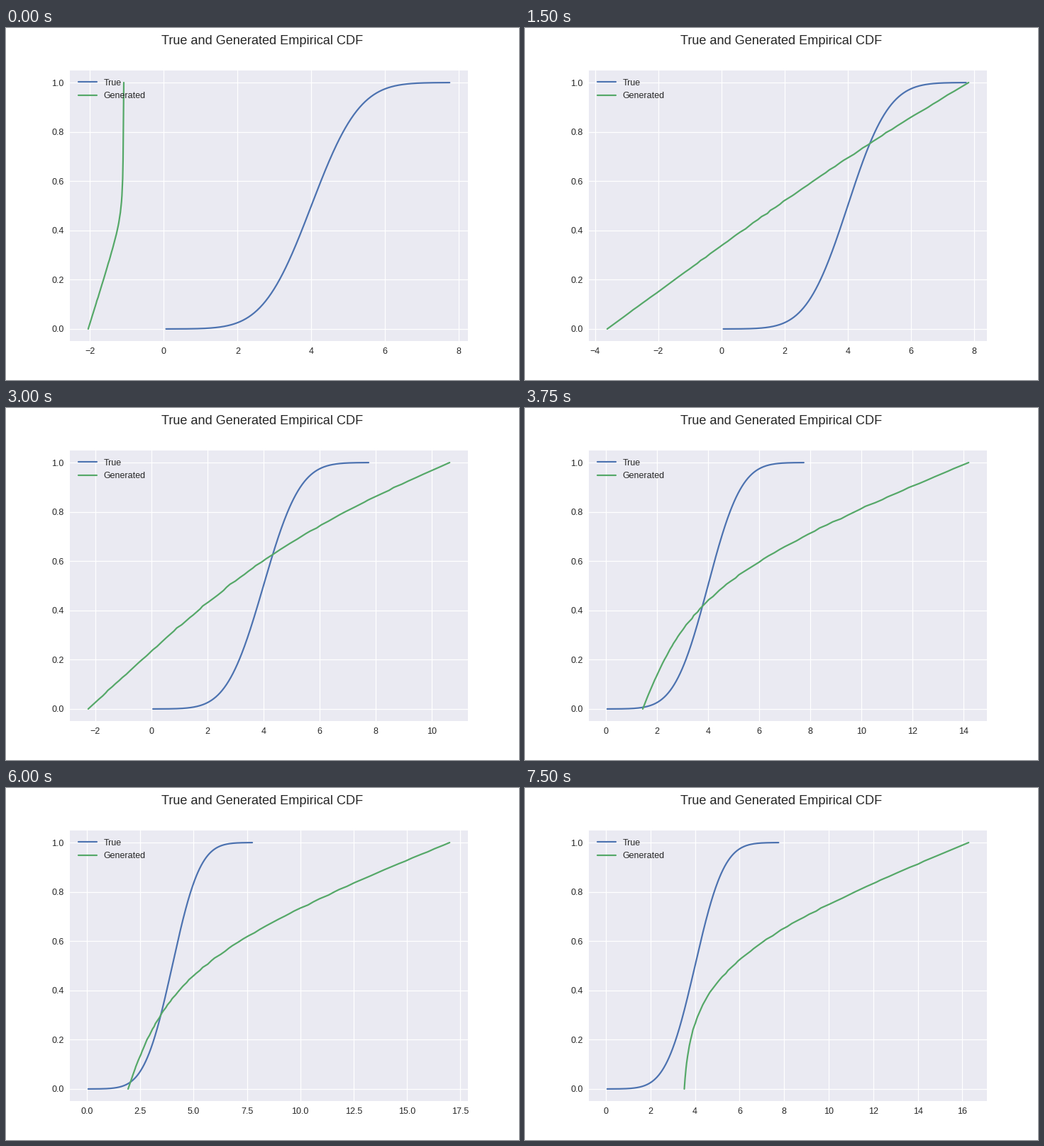
Write a matplotlib script that moves like this. It is 723x497 px and loops after 8000 ms.

```python
import math

import numpy as np
import matplotlib.pyplot as plt
from matplotlib.animation import FuncAnimation

W, H, DPI = 723, 497, 90.4
STEP_MS, HOLD, FRAMES = 250, 3, 32
BLUE, GREEN, PANEL, INK = "#4C72B0", "#55A868", "#EAEAF2", "0.15"
MEAN, SD = 4, 1.025

plt.rcParams.update({
    "font.family": "Liberation Sans",
    "font.size": 10,
    "text.color": INK,
    "lines.linewidth": 1.75,
    "lines.solid_capstyle": "round",
    "axes.facecolor": PANEL,
    "axes.axisbelow": True,
    "grid.color": "white",
    "grid.linewidth": 1,
    "xtick.color": INK,
    "ytick.color": INK,
})

rng = np.random.default_rng(11)
prob = np.linspace(0, 1, 400)


def softplus(z):
    return np.logaddexp(0, z)


def roughen(p):
    """Shift probabilities a little, as a finite sample would."""
    knots = np.linspace(0, 1, 80)
    noise = rng.normal(0, .0026, knots.size) * np.sqrt(knots * (1 - knots))
    return np.clip(p + np.interp(p, knots, noise), 0, 1)


def quantiles(lo, hi, line, centre=.55, width=.15):
    """Generated sample from lo to hi: a straight line mixed with a soft bend."""
    p = roughen(prob)
    start, end = softplus(-centre / width), softplus((1 - centre) / width)
    bend = (softplus((p - centre) / width) - start) / (end - start)
    return np.sort(lo + (hi - lo) * (line * p + (1 - line) * bend))


# One training snapshot after another: range, straightness, place of the bend
SNAPSHOTS = [
    quantiles(-2.05, -1.085, 2.15, .45, .06),
    quantiles(-3.35, 6.5, 1.04),
    quantiles(-3.62, 7.83, .93, .75),
    quantiles(-3.83, 9.0, .84, .75),
    quantiles(-2.25, 10.64, .73, .75),
    quantiles(1.45, 14.2, .25),
    quantiles(1.6, 16.87, .255),
    quantiles(1.82, 17.77, .26),
    quantiles(1.93, 17.0, .21),
    quantiles(2.7, 17.47, .1),
    quantiles(3.52, 16.28, 0),
]

true_x = np.linspace(.06, 7.75, 300)
true_p = [.5 * math.erfc((MEAN - x) / (SD * math.sqrt(2))) for x in true_x]

fig = plt.figure(figsize=((W + .001) / DPI, (H + .001) / DPI), dpi=DPI,
                 facecolor="white")
ax = fig.add_axes([.125, .11, .775, .77])
fig.suptitle("True and Generated Empirical CDF", fontsize=14.4, y=.98)
ax.plot(true_x, true_p, color=BLUE, label="True")
generated, = ax.plot([], [], color=GREEN, label="Generated")
ax.set_ylim(-.05, 1.05)
ax.grid(True)
ax.tick_params(length=0, pad=7)
for spine in ax.spines.values():
    spine.set_visible(False)
ax.legend(loc="upper left", frameon=False, borderaxespad=.56)


def draw(frame):
    x = SNAPSHOTS[frame // HOLD]
    generated.set_data(x, prob)
    lo, hi = min(x[0], true_x[0]), max(x[-1], true_x[-1])
    pad = .05 * (hi - lo)
    ax.set_xlim(lo - pad, hi + pad)
    return generated,


anim = FuncAnimation(fig, draw, frames=FRAMES, interval=STEP_MS,
                     init_func=lambda: draw(0), repeat=True, repeat_delay=0)
plt.show()
```
